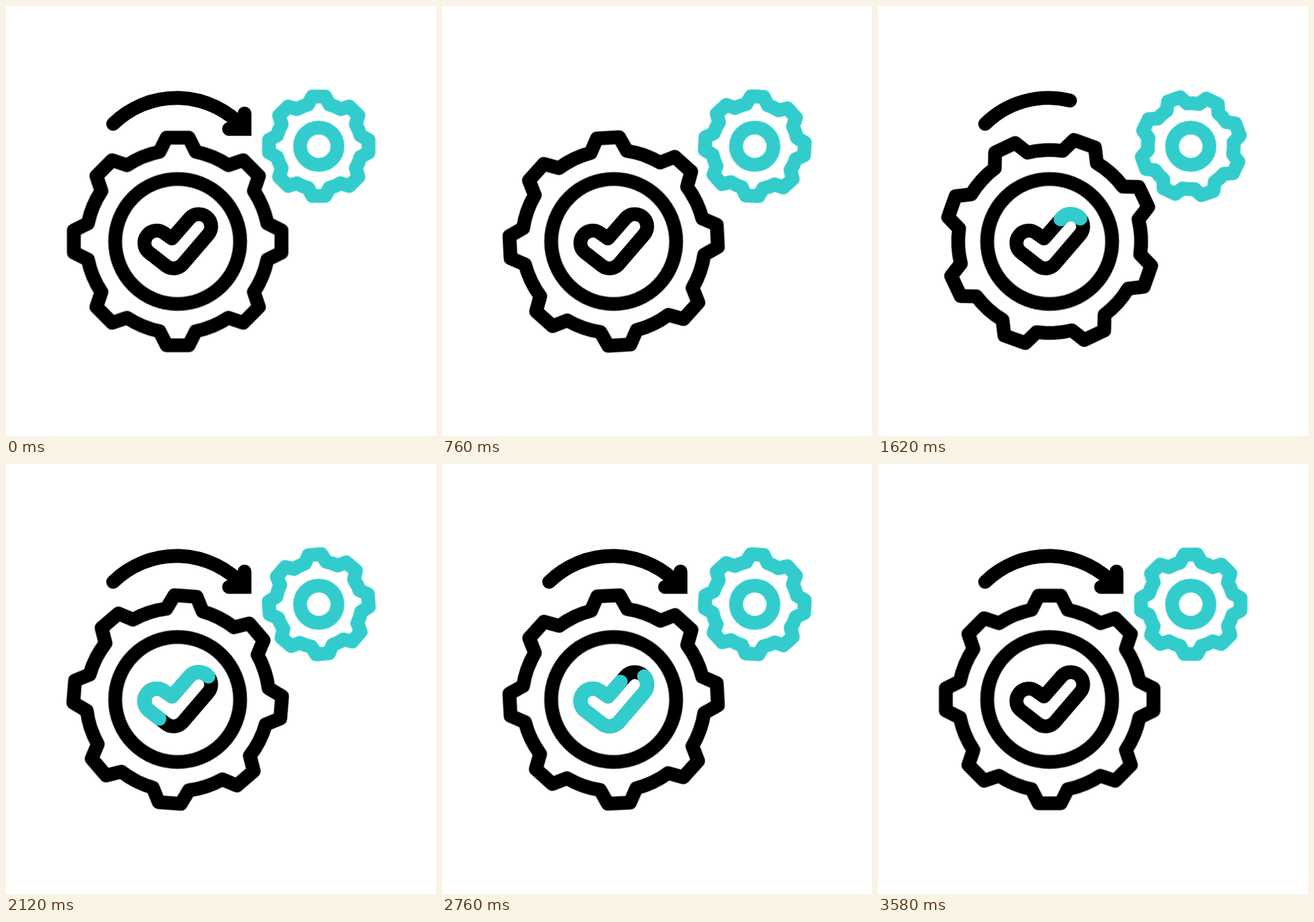
Recreate the animation shown at these times as an HTML page. Size 640 by 640 pixels, loop 3600 ms.

```html
<!DOCTYPE html>
<html lang="en">
<head>
<meta charset="utf-8">
<title>Gears</title>
<style>
  @property --a { syntax: "<length>"; inherits: true; initial-value: 0px; }
  @property --b { syntax: "<length>"; inherits: true; initial-value: 0px; }

  html, body { margin: 0; width: 100%; height: 100%; overflow: hidden; background: #fff; }
  svg { display: block; width: 100vw; height: 100vh; }

  .line { fill: none; stroke: #000; stroke-width: 20.6; stroke-linecap: round; stroke-linejoin: round; }
  .teal { stroke: #33cccc; }

  .spin, .arrow, .trace {
    animation-duration: 3.6s;
    animation-iteration-count: infinite;
    animation-timing-function: cubic-bezier(.3333, 0, .6667, 1);
  }
  .spin { animation-name: spin; transform-origin: 0 0; }
  .back { animation-direction: normal; animation-name: spin-back; }
  .arrow { animation-name: arrow; }
  .trace { animation-name: draw, cut; stroke-width: 21.2; }

  /* Only the stretch from --a to --b along the path is stroked. */
  .trim { stroke-dasharray: calc(var(--b) - var(--a)) 2000px; stroke-dashoffset: calc(0px - var(--a)); }
  .head { stroke-dashoffset: calc(218px - var(--a)); stroke-linejoin: miter; }

  @keyframes spin { 0% { transform: rotate(0deg); } 99.444%, 100% { transform: rotate(360deg); } }
  @keyframes spin-back { 0% { transform: rotate(0deg); } 99.444%, 100% { transform: rotate(-360deg); } }
  @keyframes arrow {
    0% { --a: 0px; --b: 266px; }
    17.5%, 36.11% { --a: 266px; --b: 266px; }
    36.12% { --a: 0px; --b: 0px; }
    53.6%, 100% { --a: 0px; --b: 266px; }
  }
  @keyframes draw {
    0%, 36.11% { --b: 101px; }
    36.12% { --b: 0px; }
    78.33%, 100% { --b: 101px; }
  }
  @keyframes cut {
    0%, 36.11% { --a: 101px; }
    36.12%, 69.44% { --a: 0px; }
    99.44%, 100% { --a: 101px; }
  }
</style>
</head>
<body>
<svg viewBox="0 0 640 640">
  <defs>
    <path id="tick" pathLength="100" d="M301 316.2 A18.4 18.4 0 0 0 273.4 315.7 L247 346 L234.9 337.6
      A18.4 18.4 0 0 0 212.1 366.4 L237.8 386.4 A18.4 18.4 0 0 0 263 384.4
      L300.8 340.3 A18.4 18.4 0 0 0 301 316.2 Z"/>
  </defs>

  <g class="line" transform="translate(255.5 350.5)">
    <path id="big" class="spin"/>
    <circle r="93"/>
  </g>

  <g class="line teal" transform="translate(465.5 208.7)">
    <path id="small" class="spin back"/>
    <circle r="27.8"/>
  </g>

  <g class="line arrow">
    <path class="trim" d="M159.5 175.5 A134 134 0 0 1 354 182"/>
    <path class="trim head" d="M355 160 V183 H332"/>
  </g>

  <use href="#tick" class="line"/>
  <g class="trace">
    <path class="line teal trim" style="stroke-width:21.2" pathLength="100" id="mark"/>
  </g>
</svg>
<script>
  const $ = id => document.getElementById(id);

  // Eight teeth: half width and height of the tip, then of the root.
  function gear(id, tipX, tipY, rootX, rootY) {
    const r = Math.hypot(rootX, rootY);
    let d = "";
    for (let i = 0; i < 8; i++) {
      const c = Math.cos(i * Math.PI / 4), s = Math.sin(i * Math.PI / 4);
      const at = (x, y) => `${(x * c + y * s).toFixed(2)} ${(x * s - y * c).toFixed(2)}`;
      d += (i ? `A${r} ${r} 0 0 1 ` : "M") + at(-rootX, rootY);
      d += `L${at(-tipX, tipY)}L${at(tipX, tipY)}L${at(rootX, rootY)}`;
    }
    $(id).setAttribute("d", d + `A${r} ${r} 0 0 1 ${-rootX} ${-rootY}Z`);
  }

  gear("big", 16.5, 154.5, 27, 133.5);
  gear("small", 9.5, 74, 16, 62);
  $("mark").setAttribute("d", $("tick").getAttribute("d"));
</script>
</body>
</html>
```
